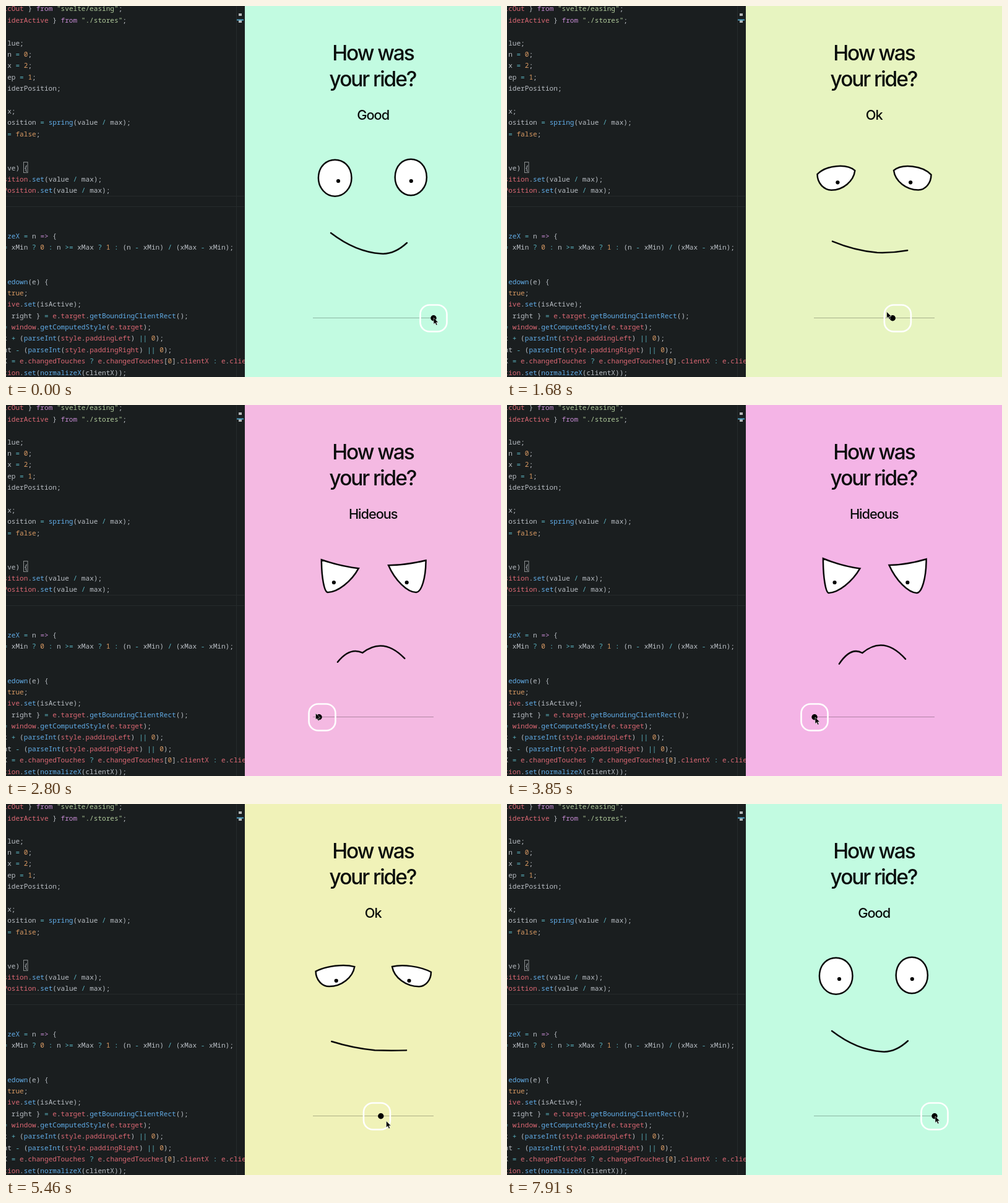
An HTML page for the animation above (7980 ms loop, 800 px wide and 600 px high).

```html
<!DOCTYPE html>
<html lang="en">
<head>
<meta charset="utf-8">
<title>Ride feedback slider</title>
<style>
html, body { margin: 0; width: 100%; height: 100%; overflow: hidden; background: #1a1e1f; }
svg { display: block; }
#code text { font: 11.08px "Noto Sans Mono", "DejaVu Sans Mono", monospace; fill: #b9bec4; white-space: pre; }
#code .str { fill: #afc99a; }
#code .num { fill: #d99a63; }
#code .key { fill: #c58ad2; }
#code .call { fill: #62aeea; }
#code .ref { fill: #dd6874; }
#code .op { fill: #5bb5c3; }
.ui { font-family: Inter, Roboto, sans-serif; font-optical-sizing: none; font-weight: 450; text-anchor: middle; fill: #0a0d0c; }
.title { font-size: 33.5px; letter-spacing: -.062em; }
#label { font-size: 21.8px; letter-spacing: -.049em; }
.line { fill: none; stroke: #0a0a0a; stroke-width: 2.5; stroke-linecap: round; }
.eye { fill: #fff; stroke: #0a0a0a; stroke-width: 2.5; }
</style>
</head>
<body>
<svg width="800" height="600" viewBox="0 0 800 600">
  <rect width="800" height="600" fill="#1a1e1f"/>
  <path d="M0 307.5H385M0 324.5H385M372.5 0V600" stroke="#262b2c"/>
  <rect x="28.5" y="252.5" width="6.5" height="17" fill="none" stroke="#8b8f90"/>
  <g id="code"></g>
  <path d="M376 12h5v4h-5zM376 23h5v4h-5z" fill="#b4b8b9"/>
  <path d="M373 22.5H384" stroke="#4f9fc0" stroke-width="2"/>
  <rect id="panel" x="386" width="414" height="600"/>
  <g class="ui">
    <text class="title" x="593" y="88">How was</text>
    <text class="title" x="592.5" y="129.8">your ride?</text>
    <text id="label" x="593.2" y="183.9"></text>
  </g>
  <path id="left" class="eye"/>
  <path id="right" class="eye"/>
  <circle id="leftPupil" r="3.1"/>
  <circle id="rightPupil" r="3.1"/>
  <path id="mouth" class="line"/>
  <path d="M496 504.5H691" stroke="#000" stroke-opacity=".28"/>
  <circle id="dot" cy="504.7" r="4.7"/>
  <rect id="ring" y="483.5" width="43" height="43" rx="15" fill="none" stroke="#fff" stroke-width="2.6"/>
  <path id="cursor" d="M0 0V10.4L2.4 8.3 4.2 12.2 6 11.4 4.3 7.6H7.5Z" stroke="#fff" stroke-width=".5"/>
</svg>
<script>
const $ = id => document.getElementById(id);
const set = (id, attrs) => { for (const k in attrs) $(id).setAttribute(k, attrs[k]); };
const LOOP = 7980, STEP = 70, RING_LAG = 65, POINTER_LEAD = 80, MIN_X = 496, MAX_X = 691;

// Editor text, starting one column left of the stage edge
const source = `icOut } from "svelte/easing";
 iderActive } from "./stores";

 lue;
 n = 0;
 x = 2;
 ep = 1;
 iderPosition;

 x;
 osition = spring(value / max);
 = false;


 ve) {
sition.set(value / max);
Position.set(value / max);



 zeX = n => {
= xMin ? 0 : n >= xMax ? 1 : (n - xMin) / (xMax - xMin);


 edown(e) {
 true;
 ive.set(isActive);
  right } = e.target.getBoundingClientRect();
= window.getComputedStyle(e.target);
t + (parseInt(style.paddingLeft) || 0);
ht - (parseInt(style.paddingRight) || 0);
X = e.changedTouches ? e.changedTouches[0].clientX : e.clientX;
tion.set(normalizeX(clientX));`;
const token = /(?<str>"[^"]*")|(?<num>\b\d|true|false)|(?<key>from|=>)|(?<call>\w+(?=\()|zeX)|(?<ref>icOut|iderActive|\w+(?=\.)|(?<=\.)\w+)|(?<op>[=+\-\/?:|<>]+)/g;
const escape = s => s.replace(/</g, '&lt;').replace(/>/g, '&gt;');
const tspan = (s, kind) => kind ? `<tspan class="${kind}">${escape(s)}</tspan>` : escape(s);

function highlight(src) {
  let html = '', at = 0;
  for (const m of src.matchAll(token)) {
    const kind = Object.keys(m.groups).find(k => m.groups[k]);
    html += tspan(src.slice(at, m.index)) + tspan(m[0], kind);
    at = m.index + m[0].length;
  }
  return html + tspan(src.slice(at));
}
$('code').innerHTML = source.split('\n').map((src, i) =>
  `<text xml:space="preserve" x="-4.5" y="${8.4 + i * 18.38}">${highlight(src)}</text>`).join('');

// Each list runs from hideous over ok to good
const labels = ['Hideous', 'Ok', 'Good'];
const colors = [[244, 179, 231], [247, 241, 178], [194, 251, 225]];
// Outer corner, inner corner, bottom
const eyes = {
  left: [[511, 248, 570.5, 264.5, 520, 304], [500, 269.5, 564, 261, 521, 293.3], [504.9, 278, 558.5, 278, 531.7, 307.7]],
  right: [[677.5, 249, 617.5, 259, 662, 304], [688, 271, 623.4, 261, 669.4, 293.6], [679.9, 277, 628.7, 277, 654.3, 306.2]]
};
// Rise of the upper lid, slant of the inner side
const lids = [[-3, .25], [2, .08], [39, 0]];
// Left end, joint, right end, then the bow of both halves
const mouths = [
  [537, 419, 574, 401, 644, 411, -13, -23],
  [526.4, 386.5, 594.7, 398, 646.9, 400.6, 1.5, -.5],
  [525, 367, 606, 400.5, 648, 383, 9.5, 7]
];

function mix(list, p) {
  const i = p < .5 ? 0 : 1, f = p * 2 - i;
  return list[i].map((v, n) => v + (list[i + 1][n] - v) * f);
}

function eyePath([ax, ay, bx, by, cx, cy], [lift, lean]) {
  const s = (1 - lift / 40) / 3, k = .55, dx = bx - ax, dy = by - ay, slack = k - lean;
  return `M${ax} ${ay}
    C${ax + s * dx} ${ay + s * dy - lift} ${bx - s * dx} ${by - s * dy - lift} ${bx} ${by}
    C${bx + lean * (cx - bx)} ${by + k * (cy - by)} ${cx + slack * (bx - cx)} ${cy} ${cx} ${cy}
    C${cx + k * (ax - cx)} ${cy} ${ax} ${ay + k * (cy - ay)} ${ax} ${ay}Z`;
}

function bow(ax, ay, bx, by, h) {
  const dx = (bx - ax) / 3, dy = (by - ay) / 3;
  return `C${ax + dx} ${ay + dy + h} ${bx - dx} ${by - dy + h} ${bx} ${by}`;
}

function mouthPath([ax, ay, bx, by, cx, cy, h1, h2]) {
  return `M${ax} ${ay}${bow(ax, ay, bx, by, h1)}${bow(bx, by, cx, cy, h2)}`;
}

// Drag: time and knob position, joined by a monotone cubic
const drag = [
  [0, MAX_X], [700, 665], [1190, 663], [2170, 562], [2800, 506], [2940, 497],
  [4230, 497], [4620, 527], [6370, 681], [6600, MAX_X], [LOOP, MAX_X]
];
const slope = i => drag[i] && drag[i + 1] ? (drag[i + 1][1] - drag[i][1]) / (drag[i + 1][0] - drag[i][0]) : 0;
function tangent(i) {
  const a = slope(i - 1), b = slope(i);
  return a * b > 0 ? 2 * a * b / (a + b) : 0;
}
function knob(time) {
  const t = Math.min(Math.max(time, 0), LOOP - 1);
  const i = drag.findIndex(k => k[0] > t) - 1;
  const [t0, x0] = drag[i], [t1, x1] = drag[i + 1];
  const h = t1 - t0, s = (t - t0) / h, q = 1 - s;
  return x0 * q * q * (1 + 2 * s) + x1 * s * s * (3 - 2 * s) + h * s * q * (tangent(i) * q - tangent(i + 1) * s);
}

function draw(t) {
  const x = knob(t), p = (x - MIN_X) / (MAX_X - MIN_X);
  set('panel', { fill: `rgb(${mix(colors, p).map(Math.round)})` });
  $('label').textContent = labels[Math.round(p * 2)];

  for (const side in eyes) set(side, { d: eyePath(mix(eyes[side], p), mix(lids, p)) });
  const look = { cx: 529.5 + 7.5 * p, cy: 287 - 4 * p * p };
  set('leftPupil', look);
  set('rightPupil', { ...look, cx: look.cx + 117.8 });
  set('mouth', { d: mouthPath(mix(mouths, p)) });

  // The ring trails the knob, the pointer runs ahead of it
  const lead = knob(t + POINTER_LEAD) - x;
  set('dot', { cx: x });
  set('ring', { x: knob(t - RING_LAG) - 21.5 });
  set('cursor', { transform: `translate(${x + lead + 1} ${505 + lead})` });
}

const start = performance.now();
function tick() {
  const t = (performance.now() - start) % LOOP;
  draw(Math.floor(t / STEP) * STEP);
  requestAnimationFrame(tick);
}
tick();
</script>
</body>
</html>
```
